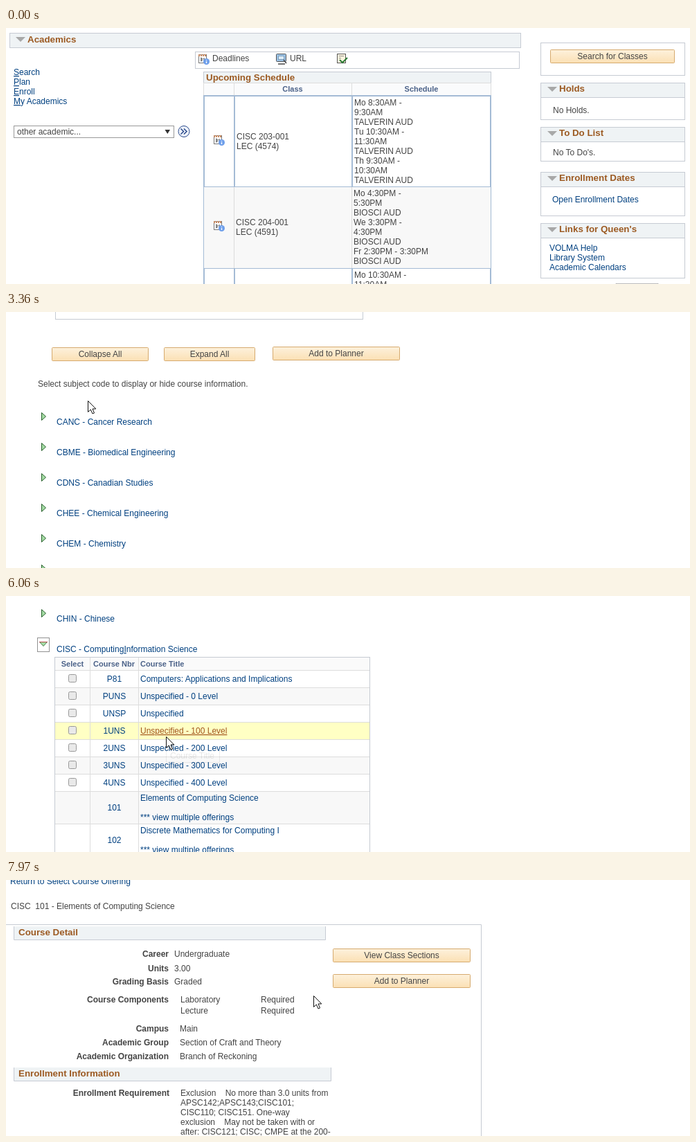
Write an HTML page that moves like this. It is 988 px wide and 370 px high and loops after 8000 ms.

```html
<!DOCTYPE html>
<html lang="en">
<head>
<meta charset="utf-8">
<title>Course planner walkthrough</title>
<style>
html, body { margin: 0; width: 988px; height: 370px; overflow: hidden; background: #fff; }
svg { display: block; }
text { font: 12px "Liberation Sans", Arial, sans-serif; fill: #444; white-space: pre; }
.link { fill: #004080; }
.head { font-weight: bold; font-size: 13.33px; fill: #9c5a22; }
.sub { font-size: 14.67px; fill: #475e88; }
.title { font-size: 18.67px; fill: #475e88; }
.col { font-weight: bold; font-size: 11px; fill: #4a6188; }
.tab { font-size: 11px; fill: #003466; }
.on { font-weight: bold; font-size: 11px; fill: #222; }
.label { font-weight: bold; }
.mid { text-anchor: middle; }
.end { text-anchor: end; }
.hot > .bg { fill: #ffffc4; }
.hot .name { fill: #a3561f; text-decoration: underline; }
</style>
</head>
<body>
<script>
const LINE = '#c6cbd3', BAR = '#eff3f5', BLUE = '#a4bbd5';
const BUMP = { sub: 5, title: 6 };

// Text centred on y; "_" underlines the letter that follows.
const text = (x, y, s, cls = '') =>
  `<text x="${x}" y="${y + (BUMP[cls] || 4)}" class="${cls}">` +
  s.replace(/_(.)/g, '<tspan text-decoration="underline">$1</tspan>') + '</text>';
const lines = (x, y, list, cls, step = 14) =>
  list.map((s, i) => text(x, y + i * step, s, cls)).join('');
const rect = (x, y, w, h, fill = '#fff', stroke = LINE, more = '') =>
  `<rect x="${x + .5}" y="${y + .5}" width="${w}" height="${h}" fill="${fill}" stroke="${stroke}" ${more}/>`;
const path = (d, fill = 'none', stroke = 'none', more = '') =>
  `<path d="${d}" fill="${fill}" stroke="${stroke}" ${more}/>`;
const group = (id, body) => `<g id="${id}">${body}</g>`;
const button = (x, y, w, s) =>
  rect(x, y, w - 1, 19, 'url(#gold)', '#d6aa6e', 'rx="1"') + text(x + w / 2, y + 10, s, 'mid');
const fold = (x, y) => path(`M${x} ${y}h14l-7 7z`, '#a8a8a8');

function panel(y, h, name, body) {
  return rect(772, y, 208, h) + rect(772, y, 208, 21, BAR) +
    fold(782, y + 6) + text(799, y + 9, name, 'head') + body;
}

function calendar(x, y) {
  return rect(x, y + 1, 11, 12, '#fff', '#777') + path(`M${x} ${y + 2.5}h12`, 'none', '#c98b62', 'stroke-width="3" stroke-dasharray="2 1"') +
    path(`M${x + 3} ${y + 6.5}h2v4h-2m0-2h2m3 2v-4l-1 1`, 'none', '#444') +
    `<circle cx="${x + 11.5}" cy="${y + 11.5}" r="4.5" fill="#6d9eea"/>` +
    path(`M${x + 11.5} ${y + 9}v1m0 1v3`, 'none', '#fff', 'stroke-width="1.4"');
}

function header(y, title, dx, tabs) {
  return rect(7, y - 10, dx - 8, 17, BAR, BAR) +
    ['My Planner', '|', '_Shopping Cart', '|', '_Course History']
      .map((s, i) => text(tabs[i], y, s, i ? 'tab' : 'on')).join('') +
    text(8, y + 28, 'My Planner', 'sub') +
    path(`M8 ${y + 38.5}H617`, 'none', '#b5b5b5') + text(7, y + 59, title, 'title');
}

function home() {
  const cells = (y, h) => [[286, 43], [330, 169], [500, 199]]
    .map(([x, w]) => rect(x, y, w, h, '#fff', BLUE)).join('');
  const aud = 'TALVERIN AUD', bio = 'BIOSCI AUD';
  return rect(5, 7, 738, 21, BAR) + fold(14, 13) + text(31, 17, 'Academics', 'head') +
    lines(11, 64, ['_Search', '_Plan', '_Enroll', '_My Academics'], 'link') +
    rect(11, 141, 231, 17, '#fff', '#999') + text(16, 150, 'other academic...') +
    path('M229.500 147h7.500l-3.750 6z', '#333') +
    '<circle cx="257" cy="149.500" r="8" fill="#edf2fb" stroke="#29488a"/>' +
    path('M252.500 145.500l4 4l-4 4m4.500-8l4 4l-4 4', 'none', '#29488a', 'stroke-width="1.500"') +
    rect(273, 34, 468, 24) + calendar(278, 37) + text(298, 44, 'Deadlines') +
    rect(390, 37, 14, 11, '#9cc3e6', '#555', 'rx="1"') + rect(393, 40, 8, 5, '#dcecf8', '#7d9fbd') +
    path('M393 52h10m-2-6l4 5', 'none', '#444', 'stroke-width="1.500"') + text(410, 44, 'URL') +
    rect(478, 37, 12, 13, '#fff6df', '#555') + path('M481 40.500h7m-7 3h3', 'none', '#888') +
    path('M482 46l4 4l7-7', 'none', '#2c7b35', 'stroke-width="2"') +
    rect(285, 63, 415, 16, BAR) + text(289, 72, 'Upcoming Schedule', 'head') +
    rect(285, 79, 415, 18, '#fafbfc', '#ddd') + path('M329.500 80v17m170-17v17', 'none', '#ddd') +
    text(414, 88, 'Class', 'col mid') + text(600, 88, 'Schedule', 'col mid') +
    rect(285, 97, 415, 290, '#f8f8f8', BLUE) + path('M329.500 230v117m170-117v117', 'none', '#dcdcdc') +
    cells(98, 131) + cells(347, 40) + calendar(300, 154) + calendar(300, 278) +
    lines(333, 157, ['CISC 203-001', 'LEC (4574)']) + lines(332, 281, ['CISC 204-001', 'LEC (4591)']) +
    lines(503, 108, ['Mo 8:30AM -', '9:30AM', aud, 'Tu 10:30AM -', '11:30AM', aud, 'Th 9:30AM -', '10:30AM', aud]) +
    lines(502, 239, ['Mo 4:30PM -', '5:30PM', bio, 'We 3:30PM -', '4:30PM', bio, 'Fr 2:30PM - 3:30PM', bio]) +
    lines(503, 357, ['Mo 10:30AM -', '11:30AM']) +
    rect(772, 21, 208, 47) + button(786, 31, 180, 'Search for Classes') +
    panel(79, 53, 'Holds', text(790, 119, 'No Holds.')) +
    panel(143, 49, 'To Do List', text(790, 180, "No To Do's.")) +
    panel(208, 63, 'Enrollment Dates', text(789, 248, 'Open Enrollment Dates', 'link')) +
    panel(282, 79, "Links for Queen's",
      lines(785, 318, ['VOLMA Help', 'Library System', 'Academic Calendars'], 'link')) +
    path('M881 369.500h61', 'none', '#777', 'stroke-dasharray="1 1"');
}

function planner() {
  return header(12, 'My Planner', 267, [12, 83, 94, 176, 188]) +
    group('plan', text(8, 112, 'Browse Course Catalog', 'link') +
      rect(8, 140, 688, 260) + rect(8, 140, 688, 21, BAR) + text(18, 151, 'Unassigned Courses', 'head') +
      ['Select', 'Course', 'Description', 'Units'].map((s, i) => text([20, 90, 210, 560][i], 176, s, 'col')).join(''));
}

const arrow = y => path(`M51.500 ${y - 5.500}v11l6-5.500z`, '#a5dca5', '#27602b');
const subjects = list => list.map((s, i) => arrow(305 + 44 * i) + text(73, 313 + 44 * i, s, 'link')).join('');

const ROWS = [['P81', 'Computers: Applications and Implications'], ['PUNS', 'Unspecified - 0 Level'],
  ['UNSP', 'Unspecified'], ['1UNS', 'Unspecified - 100 Level'], ['2UNS', 'Unspecified - 200 Level'],
  ['3UNS', 'Unspecified - 300 Level'], ['4UNS', 'Unspecified - 400 Level'],
  ['101', 'Elements of Computing Science'], ['102', 'Discrete Mathematics for Computing I']];
const rowTop = i => i < 8 ? 107 + 25 * i : 282 + 47 * (i - 7);

function courses() {
  let out = '<rect x="40" y="60" width="490" height="330" fill="#fff"/>' +
    path('M48.500 66.500h11l-5.500 6z', '#a5dca5', '#4d7a4d') + path('M48 66.500h12', 'none', '#b04a4a') +
    text(73, 77, 'CISC - Computing_Information Science', 'link') +
    rect(70, 88, 455, 19, '#fafafa') + text(96, 98, 'Select', 'col mid') +
    text(156, 98, 'Course Nbr', 'col mid') + text(194, 98, 'Course Title', 'col');
  ROWS.forEach(([code, name], i) => {
    const y = rowTop(i), tall = i > 6;
    out += '<g class="row">' + rect(70, y, 455, tall ? 47 : 25, i % 2 ? '#f8f8f8' : '#fff', '#ddd', 'class="bg"') +
      (tall ? text(194, y + 38, '*** view multiple offerings', 'link')
        : rect(90, y + 6, 11, 11, '#e9e9e9', '#999', 'rx="2"')) +
      text(156.5, y + (tall ? 24 : 13), code, 'link mid') +
      text(194, y + (tall ? 10 : 13), name, 'link name') + '</g>';
  });
  return out + path('M121.500 89v300m70-300v300', 'none', '#ddd') + path('M70.500 88v300m455-300v300', 'none', LINE);
}

function catalog() {
  const keys = [...'ABCDEFGHIJKLMNOPQRSTUVWXYZ'].map((c, i) =>
    text(i ? 88 + 16 * i : 92, i ? 129 : 131, i ? c : '_A', 'link mid')).join('') +
    [...'0123456789'].map((c, i) => text(195.500 + 16 * i, 149, c, 'link mid')).join('');
  return header(6, 'Browse Course Catalog', 257, [11, 78, 89, 167, 179]) +
    text(3, 109, "Queen's University | Undergraduate") + rect(71, 119, 444, 45) + keys +
    button(66, 205, 140, 'Collapse All') + button(228, 205, 132, 'Expand All') +
    button(385, 204, 184, 'Add to Planner') +
    text(46, 258, 'Select subject code to display or hide course information.') +
    group('listA', subjects(['AGHE - Aging and Health', 'ANAT - Anatomy and Cell Biology'])) +
    group('listC', subjects(['CANC - Cancer Research', 'CBME - Biomedical Engineering', 'CDNS - Canadian Studies',
      'CHEE - Chemical Engineering', 'CHEM - Chemistry', 'CHIN - Chinese', 'CISC - Computing_Information Science',
      'CIVL - Civil Engineering', 'CLAS - Classics', 'CLST - Classical Studies', 'CMAS - Collab Master Appl Sustain',
      'CMC - Communications Studies', 'CMPE - Computing in Engineering'])) +
    '<g transform="translate(0 500)">' + group('table', courses()) +
    group('focus', rect(45, 60, 17, 20, 'none', '#222', 'stroke-dasharray="1 1"')) + '</g>';
}

function offering() {
  return header(12, 'Select Course Offering', 267, [12, 83, 94, 176, 188]) +
    text(7, 122, 'CISC  101 - Elements of Computing Science') +
    rect(7, 150, 915, 66) + rect(7, 150, 915, 20, BAR) + text(18, 160, 'Course Offerings', 'head') +
    text(20, 190, 'Elements of Computing Science', 'link') + text(420, 190, 'Main') + text(620, 190, 'Undergraduate');
}

function detail() {
  const bar = (y, w, s) => rect(11, y, w, 19, BAR, BAR) +
    path(`M11.500 ${y}v19.500h${w}v-19.500`, 'none', LINE) + text(18, y + 9, s, 'head');
  const field = (y, label, value, x = 251) => text(235, y, label, 'label end') + text(x, y, value);
  return header(12, 'Course Detail', 267, [12, 81, 94, 174, 188]) +
    text(6, 122, 'Return to Select Course Offering', 'link') +
    text(7, 158, 'CISC  101 - Elements of Computing Science') +
    path('M0 184.500H686.500V600', 'none', LINE) + bar(187, 450, 'Course Detail') +
    button(472, 219, 199, 'View Class Sections') + button(472, 256, 199, 'Add to Planner') +
    field(227, 'Career', 'Undergraduate', 243) + field(248, 'Units', '3.00', 243) +
    field(267, 'Grading Basis', 'Graded', 243) + field(293, 'Course Components', 'Laboratory', 252) +
    text(252, 309, 'Lecture') + lines(368, 293, ['Required', 'Required'], '', 16) +
    field(335, 'Campus', 'Main') + field(355, 'Academic Group', 'Section of Craft and Theory') +
    field(375, 'Academic Organization', 'Branch of Reckoning') + bar(391, 458, 'Enrollment Information') +
    text(236, 428, 'Enrollment Requirement', 'label end') +
    lines(252, 428, ['Exclusion    No more than 3.0 units from', 'APSC142;APSC143;CISC101;',
      'CISC110; CISC151. One-way', 'exclusion    May not be taken with or', 'after: CISC121; CISC; CMPE at the 200-']);
}

document.body.innerHTML = `<svg width="988" height="370">
  <defs><linearGradient id="gold" x2="0" y2="1"><stop stop-color="#fdf1dc"/><stop offset="1" stop-color="#fbe0b4"/></linearGradient></defs>` +
  Object.entries({ home, planner, catalog, offering, detail }).map(([id, draw]) => group(id, draw())).join('') +
  group('tip', rect(231, 222, 77, 18, '#fff', '#777') + text(237, 231, 'Course Title')) +
  group('cursor', path('M.5 .5V16.500L4.300 13L7 19L9.500 18L7 12H11.800Z', '#fff', '#111')) + '</svg>';

const $ = id => document.getElementById(id);
const rows = document.querySelectorAll('.row');
const PAGES = [['home', 0], ['planner', 760], ['catalog', 1890], ['offering', 6840], ['detail', 7120], ['', 8000]];
const CURSOR = [[180, 190, 371], [560, 20, 76], [1020, 20, 76], [1450, 92, 110], [1890, 92, 110], [2100, 90, 130],
  [2290, 106, 137], [2520, 118, 128], [4340, 118, 128], [4640, 54, 68], [4760, 54, 68], [4960, 155, 101],
  [5160, 160, 104], [5870, 231, 203], [6300, 231, 203], [6650, 250, 293], [6840, 250, 293], [7200, 335, 215],
  [7590, 390, 218], [7890, 390, 218], [7970, 444, 167]];
const SCROLL = [[3040, 0], [3200, 90], [3360, 153], [3440, 232], [3490, 232], [4280, 500]];
const DETAIL = [[7600, 0], [7740, 120]];

// Linear interpolation through [time, ...values] keys.
function at(keys, t) {
  const i = keys.findIndex(k => k[0] > t);
  if (i < 1) return keys.at(i).slice(1);
  const a = keys[i - 1], b = keys[i], p = (t - a[0]) / (b[0] - a[0]);
  return a.slice(1).map((v, j) => Math.round(v + (b[j + 1] - v) * p));
}
const show = (id, on) => { $(id).style.display = on ? '' : 'none'; };
const move = (id, x, y) => $(id).setAttribute('transform', `translate(${x} ${y})`);

function render(t) {
  for (let i = 0; i < 5; i++) show(PAGES[i][0], t >= PAGES[i][1] && t < PAGES[i + 1][1]);
  const [x, y] = at(CURSOR, t);
  show('cursor', t >= 180);
  move('cursor', x, y);
  move('catalog', 0, -at(SCROLL, t)[0]);
  move('detail', 0, -at(DETAIL, t)[0]);
  show('plan', t < 1700);
  show('listA', t < 2860);
  show('listC', t >= 2860);
  show('focus', t >= 4680 && t < 6600);
  show('table', t >= 5040);
  rows.forEach((r, i) => r.classList.toggle('hot', y >= rowTop(i) && y < rowTop(i + 1)));
  show('tip', t >= 6050 && t < 6300);
  $('tip').style.opacity = Math.min(1, .12 + Math.max(0, t - 6070) / 130);
}

const start = performance.now();
(function loop() {
  render((performance.now() - start) % 8000);
  requestAnimationFrame(loop);
})();
</script>
</body>
</html>
```
